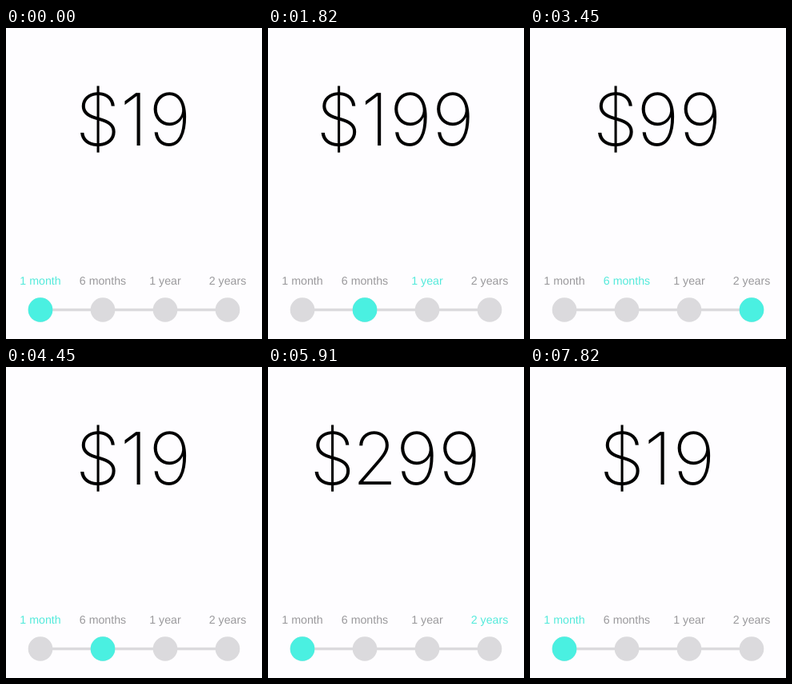
Write an HTML page that moves like this. It is 320x389 px and loops after 8.63 s.

```html
<!DOCTYPE html>
<html lang="en">
<head>
<meta charset="utf-8">
<title>Plan slider</title>
<style>
  html, body { margin: 0; height: 100%; overflow: hidden; background: #fefdff; }
  svg { display: block; width: 100vw; height: 100vh; }
  text { text-anchor: middle; text-rendering: geometricPrecision; }
  #price { font: 200 90.5px Inter, Roboto, Lato, sans-serif; font-optical-sizing: none; fill: #000; }
  .label { font: 14.2px "Liberation Sans", Arial, sans-serif; fill: #9a999c; }
  .label.active { fill: #54eadb; }
  .track { fill: #dbdadd; stroke: #dbdadd; stroke-width: 3.5; }
  .track circle { stroke: none; }
  #knob { fill: #4af0e1; }
</style>
</head>
<body>
<svg viewBox="0 0 320 389">
  <text id="price" y="146.7"></text>
  <g id="labels"></g>
  <g id="track" class="track"><path d="M43 352.5H277"/></g>
  <circle id="knob" cy="352.5" r="15.3"/>
</svg>
<script>
const LOOP = 8630, SLIDE_DELAY = 20, SLIDE_TIME = 330;
const plans = [
  { name: '1 month', price: '$19' },
  { name: '6 months', price: '$99' },
  { name: '1 year', price: '$199' },
  { name: '2 years', price: '$299' },
];
// [time in ms, selected plan]
const steps = [[0, 0], [1140, 1], [1820, 2], [2550, 3], [3450, 1], [4450, 0], [5910, 3], [6500, 0]];

const byId = id => document.getElementById(id);
const priceText = byId('price'), knob = byId('knob');
const stopX = index => 43 + 78 * index;

function add(parent, tag, attributes) {
  const node = document.createElementNS('http://www.w3.org/2000/svg', tag);
  for (const key in attributes) node.setAttribute(key, attributes[key]);
  return parent.appendChild(node);
}

const labels = plans.map(({ name }, i) => {
  add(byId('track'), 'circle', { cx: stopX(i), cy: 352.5, r: 15.3 });
  const label = add(byId('labels'), 'text', { class: 'label', x: stopX(i), y: 321 });
  label.textContent = name;
  return label;
});

// Centre of each character when the whole price is centred on the stage
function charCentres(text) {
  const widths = [...text].map(c => c === '1' ? 37 : 53);
  let x = 160 - widths.reduce((a, b) => a + b) / 2;
  return widths.map(w => (x += w) - w / 2);
}

let shown = -1;
function select(index) {
  if (index === shown) return;
  shown = index;
  const { price } = plans[index];
  priceText.setAttribute('x', charCentres(price).join(' '));
  priceText.textContent = price;
  labels.forEach((label, i) => label.classList.toggle('active', i === index));
}

const easeInOut = p => p * p * (3 - 2 * p);

function draw() {
  const t = performance.now() % LOOP;
  const current = steps.findLastIndex(([start]) => t >= start);
  const [start, target] = steps[current];
  const previous = current ? steps[current - 1][1] : target;
  const progress = Math.min(1, Math.max(0, (t - start - SLIDE_DELAY) / SLIDE_TIME));
  select(target);
  knob.setAttribute('cx', stopX(previous + (target - previous) * easeInOut(progress)));
  requestAnimationFrame(draw);
}
draw();
</script>
</body>
</html>
```
